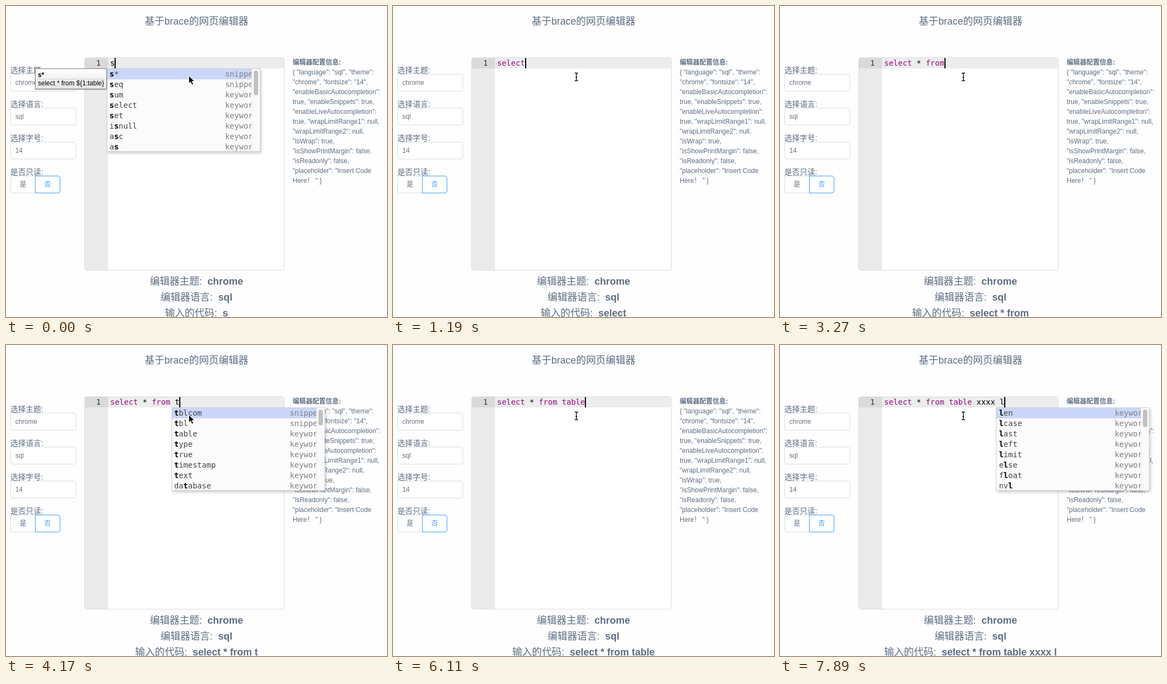
An HTML page that plays this animation: 695 by 568 pixels, repeating every 8 s.

```html
<!DOCTYPE html>
<html lang="zh-CN">
<head>
<meta charset="utf-8">
<title>基于brace的网页编辑器</title>
<style>
html, body { margin: 0; width: 100%; height: 100%; overflow: hidden; background: #fefefe; }
#stage { position: relative; width: 695px; height: 568px; overflow: hidden; color: #5e6d82;
  font: 12px/18px "Liberation Sans", "Noto Sans CJK SC", "Noto Sans CJK", sans-serif; }
#stage * { box-sizing: border-box; }
.abs, .label, .input, .btn, .big, .line, #popup, #tip, #caret, .row, .meta, .bar, .thumb { position: absolute; white-space: pre; }
.big { left: 0; width: 695px; height: 28px; font-size: 18px; line-height: 28px; font-weight: 500; text-align: center; }
.label { left: 8px; height: 20px; font-size: 14px; line-height: 20px; font-weight: 500; }
.input { left: 8px; width: 120px; height: 32px; padding-left: 8px; line-height: 30px;
  color: #6a7180; border: 1px solid #d8dce5; border-radius: 4px; background: #fff; }
.btn { top: 310px; width: 46px; height: 32px; line-height: 30px; text-align: center; font-weight: 500;
  border: 1px solid #d8dce5; background: #fff; }
.info { left: 523px; }
.mono { font-family: "DejaVu Sans Mono", "Noto Sans Mono", monospace; font-size: 14px; line-height: 19px; color: #000; }
#editor { left: 143px; top: 94px; width: 365px; height: 389px; border: 1px solid #d8dce5; border-radius: 4px; background: #fff; overflow: hidden; }
#gutter { left: 0; top: 0; width: 42px; height: 100%; background: #ebebeb; }
#number { left: 0; top: 0; width: 42px; height: 19px; padding-right: 13px; text-align: right; color: #333; background: #dadada; }
#active { left: 42px; top: 0; right: 0; height: 19px; background: #ededed; }
#code { left: 190px; top: 95px; }
#code i { font-style: normal; color: #930f80; }
#caret { top: 95px; width: 2px; height: 19px; background: #000; }
#popup { top: 114px; width: 280px; background: #fbfbfb; border: 1px solid #d3d3d3; box-shadow: 2px 3px 5px rgba(0,0,0,.2); }
#rows { position: absolute; inset: 0; overflow: hidden; }
.row { left: 0; right: 0; height: 19px; padding-left: 4px; color: #444; }
.row.on { background: #cad6fa; }
.row b { color: #000; }
.meta { top: 0; color: #808080; }
.bar { right: 0; top: 0; bottom: 0; width: 15px; background: #fafafa; border-left: 1px solid #e8e8e8; }
.thumb { left: 3px; top: 3px; width: 8px; border-radius: 4px; background: #c1c1c1; }
#tip { right: 511px; top: 114px; height: 38px; padding: 4px; color: #000; line-height: 14px;
  background: linear-gradient(#fff, #e5e5e5); border: 1px solid gray; border-radius: 1px; box-shadow: 0 1px 2px rgba(0,0,0,.3); }
#tip hr { height: 1px; margin: 0; border: 0; background: #ccc; }
svg { position: absolute; left: 325px; top: 118px; }
</style>
</head>
<body>
<div id="stage">
  <div class="big" style="top:14px">基于brace的网页编辑器</div>

  <div class="label" style="top:107px">选择主题:</div><div class="input" style="top:124px">chrome</div>
  <div class="label" style="top:169px">选择语言:</div><div class="input" style="top:186px">sql</div>
  <div class="label" style="top:231px">选择字号:</div><div class="input" style="top:248px">14</div>
  <div class="label" style="top:293px">是否只读:</div>
  <div class="btn" style="left:8px;border-radius:4px 0 0 4px">是</div>
  <div class="btn" style="left:53px;border-radius:0 4px 4px 0;color:#409eff;border-color:#409eff">否</div>

  <div class="abs mono" id="editor">
    <div class="abs" id="gutter"></div>
    <div class="abs" id="number">1</div>
    <div class="abs" id="active"></div>
  </div>
  <div class="abs mono" id="code"></div>
  <div id="caret"></div>

  <b class="abs info" style="top:94px">编辑器配置信息:</b>
  <div class="abs info" style="top:112px">{ "language": "sql", "theme":
"chrome", "fontsize": "14",
"enableBasicAutocompletion":
true, "enableSnippets": true,
"enableLiveAutocompletion":
true, "wrapLimitRange1": null,
"wrapLimitRange2": null,
"isWrap": true,
"isShowPrintMargin": false,
"isReadonly": false,
"placeholder": "Insert Code
Here！ " }</div>

  <div class="big" style="top:489px">编辑器主题:  <b>chrome</b></div>
  <div class="big" style="top:518px">编辑器语言:  <b>sql</b></div>
  <div class="big" style="top:547px">输入的代码:  <b id="echo"></b></div>

  <div id="popup" class="mono"><div id="rows"></div></div>
  <div id="tip"></div>
  <svg width="24" height="30">
    <path id="arrow" d="M8.5 9.5v14.2l3.3-3.1 2.4 5.6 2.6-1.1-2.4-5.4h4.6z" stroke="#fff"/>
    <g id="beam" fill="none">
      <path d="M6.5 4.5h2l1 1 1-1h2M9.5 5v13M6.5 18.5h2l1-1 1 1h2M8 12.5h3" stroke="#000" stroke-width="1.3"/>
    </g>
  </svg>
</div>
<script>
const LOOP = 8000, CHAR = 8.4287;
const $ = id => document.getElementById(id);

// Suggestion lists: typed prefix, words, start column, scroll thumb height, meta offset
const list = (prefix, words, col, thumb = 0, meta = 216) =>
  ({ prefix, words: words.split(' '), col, thumb, meta });
const lists = {
  s: list('s', 's* seq sum select set isnull asc as', 0, 45),
  se: list('se', 'seq select set else case insert offset false', 0, 115, 201),
  f: list('f', 'format first foreign from false float ifnull if', 9, 93, 201),
  fr: list('fr', 'from format first foreign references', 9),
  fro: list('fro', 'from', 9),
  t: list('t', 'tblcom tbl table type true timestamp text database', 14, 29),
  ta: list('ta', 'table timestamp database natural', 14),
  x: list('x', 'max text', 20),
  l: list('l', 'len lcase last left limit else float nvl', 25, 32)
};
const snippets = {
  's*': 'select * from ${1:table}',
  seq: 'create sequence ${1:name} start with ${2:1} increment by ${3:1} minvalue ${4:1};',
  tblcom: "comment on table ${1:table} is '${2:comment}';",
  tbl: ''
};

const step = (at, code, popup, opts = {}) => ({ at, code, popup, caret: true, row: 0, ...opts });
const steps = [
  step(0, 's', 's', { tip: 's*' }),
  step(150, 'se', 'se', { tip: 's*' }),
  step(300, 'se', 'se', { tip: 'seq' }),
  step(750, 'se', 'se', { tip: 'seq', caret: false }),
  step(890, 'se', 'se', { row: 1, caret: false }),
  step(1190, 'select'),
  step(1480, 'select '),
  step(2080, 'select ', null, { caret: false }),
  step(2230, 'select *'),
  step(2530, 'select * '),
  step(2680, 'select * f', 'f'),
  step(2820, 'select * fr', 'fr'),
  step(2970, 'select * fro', 'fro'),
  step(3270, 'select * from'),
  step(3720, 'select * from '),
  step(4170, 'select * from t', 't'),
  step(4310, 'select * from ta', 'ta', { tip: 'tblcom' }),
  step(4460, 'select * from ta', 'ta'),
  step(4910, 'select * from ta', 'ta', { caret: false }),
  step(5210, 'select * from table'),
  step(5810, 'select * from table', null, { caret: false }),
  step(6110, 'select * from table'),
  step(6250, 'select * from table '),
  step(6700, 'select * from table x', 'x'),
  step(6850, 'select * from table xx'),
  step(7000, 'select * from table xxx'),
  step(7150, 'select * from table xxxx'),
  step(7600, 'select * from table xxxx '),
  step(7890, 'select * from table xxxx l', 'l')
];

const show = (el, on) => { el.style.display = on ? '' : 'none'; };

// Bolds the letters of the prefix in the order they occur in the word
function mark(word, prefix) {
  let next = 0;
  return [...word].map(c => c === prefix[next] ? (next++, `<b>${c}</b>`) : c).join('');
}

function drawPopup({ prefix, words, col, thumb, meta }, selected) {
  $('popup').style.left = 183.7 + col * CHAR + 'px';
  $('popup').style.height = words.length * 19 + 'px';
  $('rows').innerHTML = words.map((word, i) =>
    `<div class="row${i === selected ? ' on' : ''}" style="top:${i * 19}px">${mark(word, prefix)}` +
    `<span class="meta" style="left:${meta - 1}px">${word in snippets ? 'snippet' : 'keyword'}</span></div>`
  ).join('') + (thumb ? `<div class="bar"><div class="thumb" style="height:${thumb}px"></div></div>` : '');
}

function draw({ code, popup, tip, caret, row }) {
  $('code').innerHTML = code.replace(/\b(select|from|table)\b/g, '<i>$1</i>');
  $('echo').textContent = code.trim();
  $('caret').style.left = 190 + code.length * CHAR + 'px';
  show($('caret'), caret);
  show($('popup'), popup);
  if (popup) drawPopup(lists[popup], row);
  show($('tip'), tip);
  if (tip) $('tip').innerHTML = `<b>${tip}</b><hr>${snippets[tip]}`;
  const hover = popup && lists[popup].col < 17;
  show($('arrow'), hover);
  show($('beam'), !hover);
}

let start, current;
function tick(now) {
  start ??= now;
  const t = (now - start) % LOOP;
  const next = steps.findLast(s => s.at <= t);
  if (next !== current) draw(current = next);
  requestAnimationFrame(tick);
}
draw(current = steps[0]);
requestAnimationFrame(tick);
</script>
</body>
</html>
```
